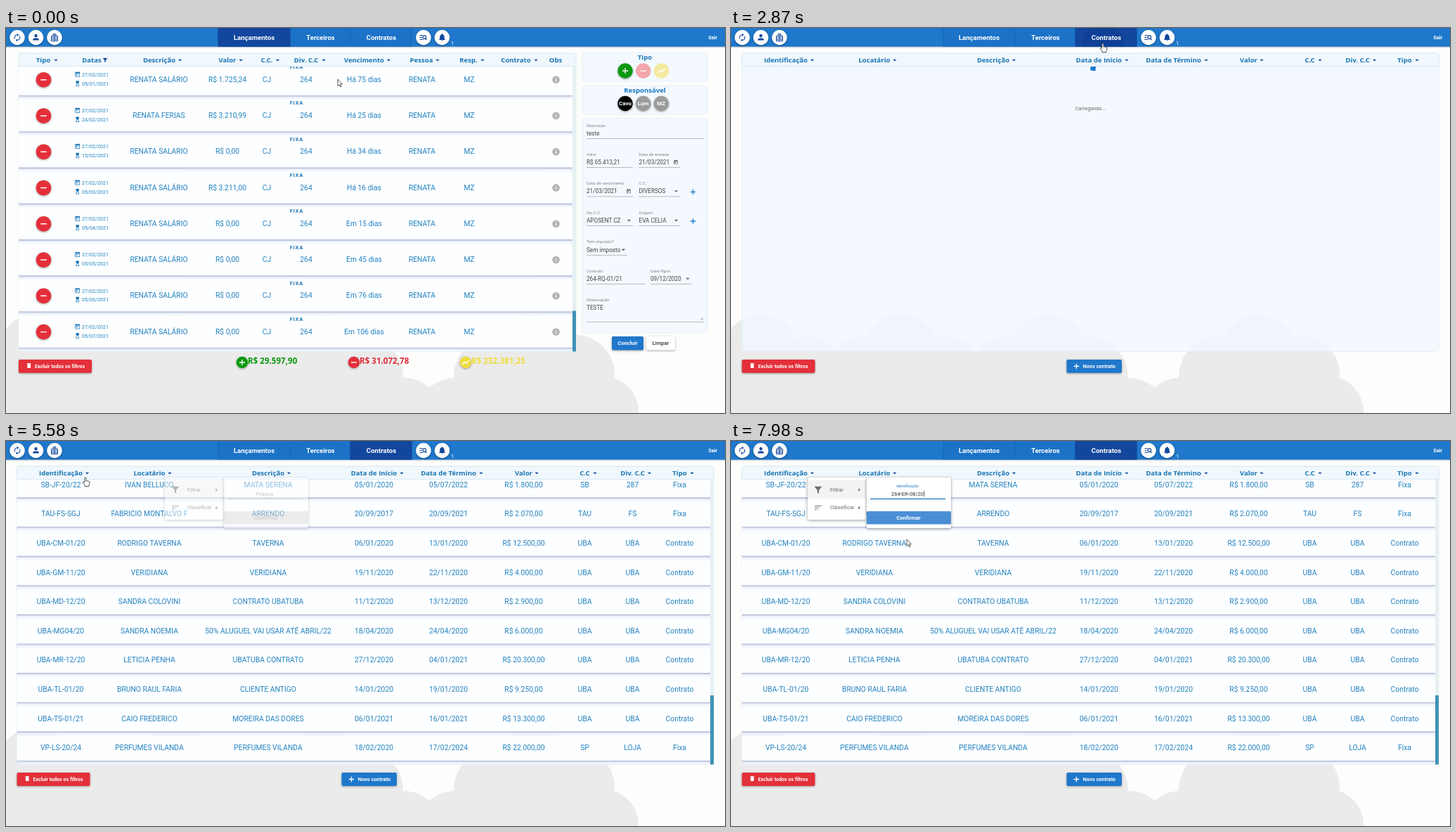
Animation of 1023x548 px, one loop 8000 ms. Source, as an HTML page:

```html
<!DOCTYPE html>
<html lang="pt-BR">
<head>
<meta charset="utf-8">
<title>Painel</title>
<style>
html, body { margin: 0; width: 100%; height: 100%; overflow: hidden; background: #fdfdfc; }
svg { display: block; width: 1023px; height: 548px; cursor: default; }
text { font-family: Roboto, sans-serif; white-space: pre; user-select: none; }
.head { font-family: "Open Sans", "Noto Sans", sans-serif; font-weight: 700; }
.bold { font-weight: 700; }
.mid { font-weight: 500; }
.start { text-anchor: start; }
text { text-anchor: middle; }
.lift { filter: drop-shadow(0 1.5px 1.5px rgba(0,0,0,.35)); }
.pop { filter: drop-shadow(0 1px 2px rgba(0,0,0,.4)); }
</style>
</head>
<body>
<svg id="stage" viewBox="0 0 1023 548"></svg>
<script>
const LOOP = 8000;
const BLUE = '#1f78cb', DARK = '#12479d', INK = '#2382c0', HEAD = '#1874b4';
const RED = '#e3303a', GREEN = '#0c990f', YELLOW = '#f0dc3e';

const ICON = {
  sync: 'M12 6v3l4-4-4-4v3c-4.4 0-8 3.6-8 8 0 1.6.5 3 1.2 4.3L6.7 14.8C6.2 14 6 13 6 12c0-3.300 2.700-6 6-6zm6.800 1.700L17.300 9.200c.4.8.7 1.800.7 2.800 0 3.300-2.700 6-6 6v-3l-4 4 4 4v-3c4.400 0 8-3.600 8-8 0-1.600-.5-3-1.200-4.300z',
  person: 'M12 12a4 4 0 1 0 0-8 4 4 0 0 0 0 8zm0 2c-2.700 0-8 1.300-8 4v2h16v-2c0-2.700-5.300-4-8-4z',
  bell: 'M12 22a2 2 0 0 0 2-2h-4a2 2 0 0 0 2 2zm6-6v-5c0-3-1.600-5.600-4.500-6.300V4a1.500 1.500 0 0 0-3 0v.7C7.600 5.400 6 8 6 11v5l-2 2v1h16v-1z',
  bin: 'M6 19a2 2 0 0 0 2 2h8a2 2 0 0 0 2-2V7H6zM19 4h-3.500l-1-1h-5l-1 1H5v2h14z',
  date: 'M19 3h-1V1h-2v2H8V1H6v2H5a2 2 0 0 0-2 2v14a2 2 0 0 0 2 2h14a2 2 0 0 0 2-2V5a2 2 0 0 0-2-2zm0 16H5V8h14zM7 10h5v5H7z',
  glass: 'M6 2v6l4 4-4 4v6h12v-6l-4-4 4-4V2zm10 14.500V20H8v-3.500l4-4z',
  sort: 'M3 18h6v-2H3zM3 6v2h18V6zm0 7h12v-2H3z',
  funnel: 'M2 3h20l-8 10v9l-4-3v-6z'
};

// Drawing helpers; text is placed by its vertical middle
const text = (s, x, y, size, fill, cls = '', extra = '') =>
  `<text x="${x}" y="${(y + size * .355).toFixed(2)}" font-size="${size}" fill="${fill}" class="${cls}" ${extra}>${s}</text>`;
const box = (x, y, x2, y2, fill, r = 0, extra = '') =>
  `<rect x="${x}" y="${y}" width="${x2 - x}" height="${y2 - y}" rx="${r}" fill="${fill}" ${extra}/>`;
const dot = (x, y, r, fill, extra = '') => `<circle cx="${x}" cy="${y}" r="${r}" fill="${fill}" ${extra}/>`;
const path = (d, stroke, w = 1) => `<path d="${d}" fill="none" stroke="${stroke}" stroke-width="${w}"/>`;
const icon = (name, x, y, size, fill) =>
  `<path d="${ICON[name]}" fill="${fill}" fill-rule="evenodd" transform="translate(${x - size / 2} ${y - size / 2}) scale(${size / 24})"/>`;
const down = (x, y, fill, w = 2.7) => `<path d="M${x - w} ${y - w / 2}h${2 * w}l${-w} ${w}z" fill="${fill}"/>`;
const plus = (x, y, r, c, w = 1.3) => path(`M${x - r} ${y}h${2 * r}M${x} ${y - r}v${2 * r}`, c, w);
const minus = (x, y, r, c, w = 1.4) => path(`M${x - r} ${y}h${2 * r}`, c, w);
const trend = (x, y, c) => path(`M${x - 5} ${y + 3}l3.500-3.500 2.500 2.200 4-4.700`, c, 1.3);
const group = (id, body, extra = '') => `<g id="${id}" ${extra}>${body}</g>`;
const panel = (x, y, x2, y2) => box(x, y, x2, y2, 'rgba(240,249,255,.75)', 3, 'stroke="#e3eef4" stroke-width=".8"');

function clouds() {
  const lobes = [[42, 462, 54], [110, 487, 48], [190, 488, 50], [242, 462, 54], [305, 487, 48], [388, 488, 49],
    [452, 462, 54], [507, 497, 58], [565, 556, 58], [640, 556, 58], [697, 497, 60], [750, 462, 54], [810, 493, 56], [848, 547, 52]];
  return `<g fill="#ebebeb">${lobes.map(l => dot(...l, '#ebebeb')).join('')}
    ${box(0, 478, 545, 548, '#ebebeb')}${box(540, 515, 880, 548, '#ebebeb')}${box(660, 470, 850, 548, '#ebebeb')}</g>`;
}

function topBar() {
  const round = x => dot(x, 13.5, 10.7, '#fff', 'class="lift"');
  const tower = path('M64.500 18.500v-7h2.500v-3h4v3h2.500v7zM69 18.500v-10M64.500 14h9M64.500 16.300h9M67 11.500h4', DARK, 1);
  const find = path('M588.500 10.500h4M588.500 13.500h3M588.500 16.500h5M598.500 17l-2-2', DARK, 1.2) +
    `<circle cx="595.300" cy="13" r="2.300" fill="none" stroke="${DARK}" stroke-width="1.200"/>`;
  return box(0, 26, 1023, 29, 'url(#fall)') + box(0, 0, 1023, 26.6, BLUE) +
    box(301, 0, 578, 26.6, '#1b72c7') + path('M301.500 0v26M404.500 0v26M489.500 0v26M577.500 0v26', '#1768b9', .8) +
    `<rect id="active" y="0" height="26.600" fill="${DARK}"/>` +
    `<g clip-path="url(#tabClip)"><circle id="ripple" cx="529" cy="22" fill="#0c2f86"/></g>` +
    text('Lançamentos', 353, 13.5, 9.6, '#fff', 'bold') + text('Terceiros', 447.5, 13.5, 9.6, '#fff', 'bold') +
    text('Contratos', 534, 13.5, 9.6, '#fff', 'bold') + [16, 42.5, 69, 594, 620.5].map(round).join('') +
    icon('sync', 16, 13.5, 13, DARK) + icon('person', 42.5, 13.2, 13, DARK) + tower + find +
    icon('bell', 620.5, 13.2, 13, DARK) + text('1', 635, 21.5, 7.5, '#fff') + text('Sair', 1005.7, 13.5, 7.2, '#fff', 'bold');
}

const header = (x, x2, cols) => box(x, 36, x2, 54.5, '#f0f8fd', 3, 'stroke="#d3e5f0" stroke-width=".8"') +
  cols.map(([s, cx, ax]) => text(s, cx, 45.5, 9.55, HEAD, 'head') + (ax ? down(ax, 46, DARK) : '')).join('');
const card = (x, x2, top, bottom) => box(x, bottom, x2, bottom + 2.5, '#dfe2f0') +
  box(x, top, x2, bottom, 'rgba(255,255,255,.88)', 2) + box(x, bottom - .5, x2, bottom + .6, '#b0b8d5', .5);
const scrollBar = (x, top) => box(x, 55, x + 5, 460.5, '#e6f0f3') + box(x, top, x + 5, 460.5, '#4093b6');
const button = (x, y, x2, y2, fill, label, cx, color = '#fff', size = 7.4, cls = 'bold') =>
  box(x, y, x2, y2, fill, 2, 'class="lift"') + text(label, cx, (y + y2) / 2 - .3, size, color, cls);
const clearButton = x => button(x, 472, x + 104, 491, RED, 'Excluir todos os filtros', x + 58.5, '#fff', 7.1) +
  icon('bin', x + 14.7, 480.5, 9.5, '#fff');

function entries() {
  const cols = [['Tipo', 53, 71], ['Datas', 122], ['Descrição', 218, 247.5], ['Valor', 315, 334], ['C.C.', 371, 386.5],
    ['Div. C.C', 427, 452], ['Vencimento', 509.5, 544.5], ['Pessoa', 591, 614], ['Resp.', 658, 678], ['Contrato', 725.5, 754], ['Obs', 782]];
  const rows = `SALÁRIO|1.725,24|05/01|Há 75 dias
FERIAS|3.210,99|24/02|Há 25 dias
SALARIO|0,00|15/02|Há 34 dias
SALÁRIO|3.211,00|05/03|Há 16 dias
SALÁRIO|0,00|05/04|Em 15 dias
SALÁRIO|0,00|05/05|Em 45 dias
SALÁRIO|0,00|05/06|Em 76 dias
SALÁRIO|0,00|05/07|Em 106 dias`.split('\n').map((line, i) => {
    const [kind, value, due, left] = line.split('|'), y = 73.2 + 51.27 * i;
    const cells = [['RENATA ' + kind, 217.5], ['R$ ' + value, 315], ['CJ', 371], ['264', 427], [left, 509.5], ['RENATA', 592], ['MZ', 659]];
    return card(18, 806, y - 22.5, y + 23.3) + dot(53.5, y + .5, 10.8, RED, 'class="lift"') + minus(53.5, y + .5, 4.3, '#fff') +
      icon('date', 101.7, y - 7, 9, HEAD) + icon('glass', 101.7, y + 5.8, 9, HEAD) +
      text('27/02/2021', 127, y - 6.8, 7.15, INK) + text(due + '/2021', 127, y + 6, 7.15, INK) +
      text('FIXA', 413.5, y - 17.5, 7, HEAD, 'head', 'letter-spacing="1"') +
      cells.map(([s, x]) => text(s, x, y, 10.3, INK)).join('') +
      dot(782.5, y + .4, 5.3, '#b4b4b4') + path(`M782.500 ${y - .4}v3.600M782.500 ${y - 2.5}v1.300`, '#fff', 1.1);
  }).join('');
  const total = (x, color, s, mark) => dot(x, 476, 8.3, color, 'class="lift"') + mark + text(s, x + 8, 474, 11.6, color, 'head start');
  return panel(18, 36, 811, 460.5) + `<g clip-path="url(#list)">${rows}</g>` + scrollBar(806, 402.5) +
    header(18, 811, cols) + icon('funnel', 141, 45.8, 8, DARK) + clearButton(18) +
    total(336, GREEN, 'R$ 29.597,90', plus(336, 476, 4, '#fff')) + total(495, RED, 'R$ 31.072,78', minus(495, 476, 4, '#fff')) +
    total(654, YELLOW, 'R$ 252.381,25', trend(654, 476, '#fff')) + form();
}

function form() {
  const field = (label, value, x, x2, y, mark) => text(label, x, y, 6.1, '#858585', 'start') +
    text(value, x, y + 11.5, 8.2, '#454545', 'start') + box(x, y + 18.6, x2, y + 19.3, '#9aa0a4') +
    (mark === 'date' ? icon('date', x2 - 6, y + 11.5, 7.5, '#555') : mark ? down(x2 - 5.5, y + 11.5, '#666') : '');
  const badge = (s, x, fill) => dot(x, 107.5, 10.7, fill, 'class="lift"') + text(s, x, 107.5, 8, '#fff', 'bold');
  return panel(820, 35, 998, 76) + panel(820, 82, 998, 123) + panel(820, 128.500, 998, 434) +
    text('Tipo', 909, 41.5, 9.55, '#1776bf', 'head') + text('Responsável', 909, 88.5, 9.55, '#1776bf', 'head') +
    dot(881, 61, 10.7, GREEN, 'class="lift"') + plus(881, 61, 4, '#fff') +
    dot(906.7, 61, 10.7, '#f0a6ab') + minus(906.7, 61, 4, '#fff') + dot(932.5, 61, 10.7, '#f4eaa0') + trend(932.5, 61, '#fff') +
    badge('Cavo', 881, '#000') + badge('Lum', 906.7, '#9b9b9b') + badge('MZ', 932.3, '#9b9b9b') +
    field('Descrição', 'teste', 826, 993, 138.5) + field('Valor', 'R$ 65.413,21', 826, 892, 179.7) +
    field('Data de entrada', '21/03/2021', 900.5, 959, 179.7, 'date') +
    field('Data de vencimento', '21/03/2021', 826, 892, 221, 'date') + field('C.C.', 'DIVERSOS', 900.5, 959, 221, 1) +
    field('Div C.C.', 'APOSENT CZ', 826, 892, 262.700, 1) + field('Origem', 'EVA CELIA', 900.5, 959, 262.7, 1) +
    field('Tem imposto?', 'Sem imposto', 826, 884, 304.3, 1) + field('Contrato', '264-RQ-01/21', 826, 909, 345.5) +
    field('Data Pgmt', '09/12/2020', 917, 975.5, 345.5, 1) + field('Observação', 'TESTE', 826, 993, 387) +
    box(826, 405, 993, 407, '#f3fafe') + box(826, 418, 993, 418.7, '#9aa0a4') + path('M988 416l4-4M990.500 416l1.500-1.500', '#777', .7) +
    plus(977.5, 233.3, 3.7, BLUE) + plus(977.5, 275, 3.7, BLUE) +
    button(862, 439, 907, 458.5, BLUE, 'Concluir', 884.5, '#fff', 7.6) +
    button(911, 439, 952, 458.5, '#fff', 'Limpar', 931.5, '#333', 7.5, 'mid');
}

function contracts() {
  const cols = [['Identificação', 78, 115.5], ['Locatário', 204, 233], ['Descrição', 373, 402.5], ['Data de Início', 523.5, 563],
    ['Data de Término', 629.5, 676], ['Valor', 736.5, 755], ['C.C', 823.5, 838], ['Div. C.C', 891.5, 915.5], ['Tipo', 958.5, 976]];
  const rows = `SB-JF-20/22|IVAN BELLUCO|MATA SERENA|05/01/2020|05/07/2022|1.800|SB|287|Fixa
TAU-FS-SGJ|FABRICIO MONTALVO F|ARRENDO|20/09/2017|20/09/2021|2.070|TAU|FS|Fixa
UBA-CM-01/20|RODRIGO TAVERNA|TAVERNA|06/01/2020|13/01/2020|12.500
UBA-GM-11/20|VERIDIANA|VERIDIANA|19/11/2020|22/11/2020|4.000
UBA-MD-12/20|SANDRA COLOVINI|CONTRATO UBATUBA|11/12/2020|13/12/2020|2.900
UBA-MG04/20|SANDRA NOEMIA|50% ALUGUEL VAI USAR ATÉ ABRIL/22|18/04/2020|24/04/2020|6.000
UBA-MR-12/20|LETICIA PENHA|UBATUBA CONTRATO|27/12/2020|04/01/2021|20.300
UBA-TL-01/20|BRUNO RAUL FARIA|CLIENTE ANTIGO|14/01/2020|19/01/2020|9.250
UBA-TS-01/21|CAIO FREDERICO|MOREIRA DAS DORES|06/01/2021|16/01/2021|13.300
VP-LS-20/24|PERFUMES VILANDA|PERFUMES VILANDA|18/02/2020|17/02/2024|22.000|SP|LOJA|Fixa`.split('\n').map((line, i) => {
    const cells = line.split('|'), y = 62 + 41.63 * i;
    cells[5] = `R$ ${cells[5]},00`;
    if (cells.length < 9) cells.push('UBA', 'UBA', 'Contrato');
    return card(15.5, 1002, y - 17, y + 18.8) + cells.map((s, c) => text(s, cols[c][1], y, 10.35, INK)).join('');
  }).join('');
  return panel(15.5, 36, 1007, 460.5) +
    group('loading', `<g clip-path="url(#list)"><rect id="cube" x="-3.700" y="-3.700" width="7.400" height="7.400" fill="${BLUE}"/></g>` +
      text('Carregando...', 511.5, 114, 7.3, '#666')) +
    group('rows', `<g clip-path="url(#list)">${rows}</g>` + scrollBar(1002, 362)) + header(15.5, 1007, cols) +
    clearButton(15.5) + button(477.5, 472, 556, 491, BLUE, 'Novo contrato', 524, '#fff', 7.3) + plus(491.5, 481.5, 3.8, '#fff');
}

function menu(id, x, label) {
  const item = (name, s, y) => icon(name, x + 15, y, 13, '#6d6d70') + text(s, x + 32, y - .5, 7.4, '#666', 'start') +
    `<path d="M${x + 72.5} ${y - 2.5}l2.500 2.500-2.500 2.500z" fill="#666"/>`;
  return group(id, box(x, 52, x + 83.5, 112, '#fff', 2, 'class="pop"') +
    box(x, 56, x + 83.5, 82, '#f3f3f3') + item('funnel', 'Filtrar', 69.5) + item('sort', 'Classificar', 95)) +
    group(id + 'Sub', box(x + 84, 52, x + 204, 124, '#fff', 2, 'class="pop"') +
      `<text id="${id}Label" x="${x + 142}" text-anchor="middle">${label}</text>` +
      `<rect id="${id}Line" x="${x + 89}" y="81.800" width="107"/>` +
      `<rect id="${id}Ok" x="${x + 84}" y="100" width="120" height="18.500" rx="1.500"/>` +
      text('Confirmar', x + 143.7, 109, 7.6, '#aaa', 'bold', `id="${id}OkText"`));
}

const stage = document.getElementById('stage');
stage.innerHTML = `<defs>
  <linearGradient id="fall" x2="0" y2="1"><stop stop-color="#889" stop-opacity=".5"/><stop offset="1" stop-color="#889" stop-opacity="0"/></linearGradient>
  <clipPath id="list"><rect x="0" y="55" width="1023" height="405.500"/></clipPath>
  <clipPath id="tabClip"><rect x="490" width="87.500" height="26.600"/></clipPath></defs>` +
  box(0, 0, 1023, 548, '#fdfdfc') + clouds() + group('entries', entries()) + group('contracts', contracts()) + topBar() +
  menu('person', 226, 'Pessoa') + menu('code', 109, 'Identificação') +
  text('', 251, 75, 7.6, '#333', '', 'id="typed"') + '<rect id="caret" y="70.500" width=".7" height="9" fill="#333"/>' +
  group('cursor', `<path id="arrow" d="M0 0V9.500L2.200 7.500 3.800 11 5.200 10.400 3.700 7H6.600Z" fill="#fff" stroke="#333" stroke-width=".8"/>
    <path id="hand" d="M0 0c-.9 0-1.100.6-1.100 1.200v6l-1.200-1.100c-.9-.5-1.800.4-1.200 1.200l2.700 4.200v1h5.500v-1c1-1.600 1.200-3 1.200-5.200 0-1-1.200-1.200-1.600-.6 0-1-1.300-1.300-1.700-.6-.2-.8-1.300-1-1.500-.3V1.200C1.100.6.9 0 0 0z" fill="#fff" stroke="#222" stroke-width=".8"/>
    <path id="beam" d="M-2-4.500h1.500l.5.5.5-.5H2M0-4v8M-2 4.500h1.500L0 4l.5.5H2" fill="none" stroke="#222" stroke-width=".9"/>`);

const $ = id => document.getElementById(id);
const set = (id, attrs) => { for (const k in attrs) $(id).setAttribute(k, attrs[k]); };
const show = (id, on) => { $(id).style.display = on ? '' : 'none'; };
const clamp = v => Math.max(0, Math.min(1, v));
const ramp = (t, from, to) => clamp((t - from) / (to - from));
const ease = v => v * v * (3 - 2 * v);

// time, x, y, pointer shape from then on
const MOVES = [[0, 472, 73, 'arrow'], [680, 211, 75, 'arrow'], [1050, 211, 75, 'arrow'], [1800, 350, 62, 'arrow'], [2420, 529, 22, 'hand'],
  [3050, 529, 22, 'hand'], [3860, 244, 49, 'hand'], [4320, 244, 49, 'arrow'], [4620, 268, 68, 'hand'], [4780, 268, 68, 'hand'],
  [5020, 360, 75, 'beam'], [5180, 360, 75, 'arrow'], [5500, 113, 52, 'hand'], [5800, 113, 52, 'hand'], [6060, 152, 68, 'hand'],
  [6160, 152, 68, 'hand'], [6440, 246, 76, 'beam'], [7640, 246, 76, 'arrow'], [7960, 250, 140, 'arrow'], [LOOP, 250, 140, 'arrow']];
const VALUE = '264-ER-08/20';
const OPEN = 2640, LOADED = 3420, FOCUS = 6680;

function pointer(t) {
  let i = 0;
  while (i < MOVES.length - 2 && t >= MOVES[i + 1][0]) i++;
  const a = MOVES[i], b = MOVES[i + 1], k = ease(ramp(t, a[0], b[0]));
  set('cursor', { transform: `translate(${a[1] + (b[1] - a[1]) * k} ${a[2] + (b[2] - a[2]) * k})` });
  for (const shape of ['arrow', 'hand', 'beam']) show(shape, shape === a[3]);
}

function fade(id, v) {
  show(id, v > 0);
  $(id).style.opacity = v;
}

function field(id, x, focus, filled) {
  set(id + 'Label', { y: 77.6 - 11.6 * focus, 'font-size': 7.4 - 1.9 * focus, fill: focus ? BLUE : '#8a8a8a' });
  set(id + 'Line', { height: focus ? 1.3 : .7, fill: focus ? BLUE : '#999' });
  set(id + 'Ok', { fill: filled ? '#4a8fd5' : '#dadada' });
  set(id + 'OkText', { fill: filled ? '#fff' : '#aaa' });
}

function draw(t) {
  const second = t >= OPEN;
  show('entries', !second);
  show('contracts', second);
  set('active', second ? { x: 489.5, width: 88 } : { x: 301.5, width: 103 });
  show('loading', t < LOADED);
  show('rows', t >= LOADED);
  set('cube', { transform: `translate(515.200 57) rotate(${8 + (t - 2870) * .3})` });
  set('ripple', { r: Math.max(0, (t - 2680) * .153), opacity: t < 2680 ? 0 : .3 * (1 - ramp(t, 2980, 3200)) });

  const gone = 1 - ramp(t, 5530, 5630);
  fade('person', ramp(t, 4290, 4400) * gone);
  fade('personSub', ramp(t, 4640, 4750) * gone);
  fade('code', ramp(t, 5770, 5880));
  fade('codeSub', ramp(t, 6080, 6190));

  const count = Math.floor(ramp(t, 6860, 7560) * VALUE.length);
  field('person', 226, 0, false);
  field('code', 109, ease(ramp(t, FOCUS, FOCUS + 120)), count > 0);
  const typed = $('typed');
  typed.textContent = VALUE.slice(0, count);
  show('caret', t >= FOCUS && (t < 7560 || t >= 7850));
  set('caret', { x: 251.5 + (count ? typed.getComputedTextLength() / 2 : 0) });
  pointer(t);
}

const begin = performance.now();
function tick() {
  draw((performance.now() - begin) % LOOP);
  requestAnimationFrame(tick);
}
draw(0);
requestAnimationFrame(tick);
</script>
</body>
</html>
```
